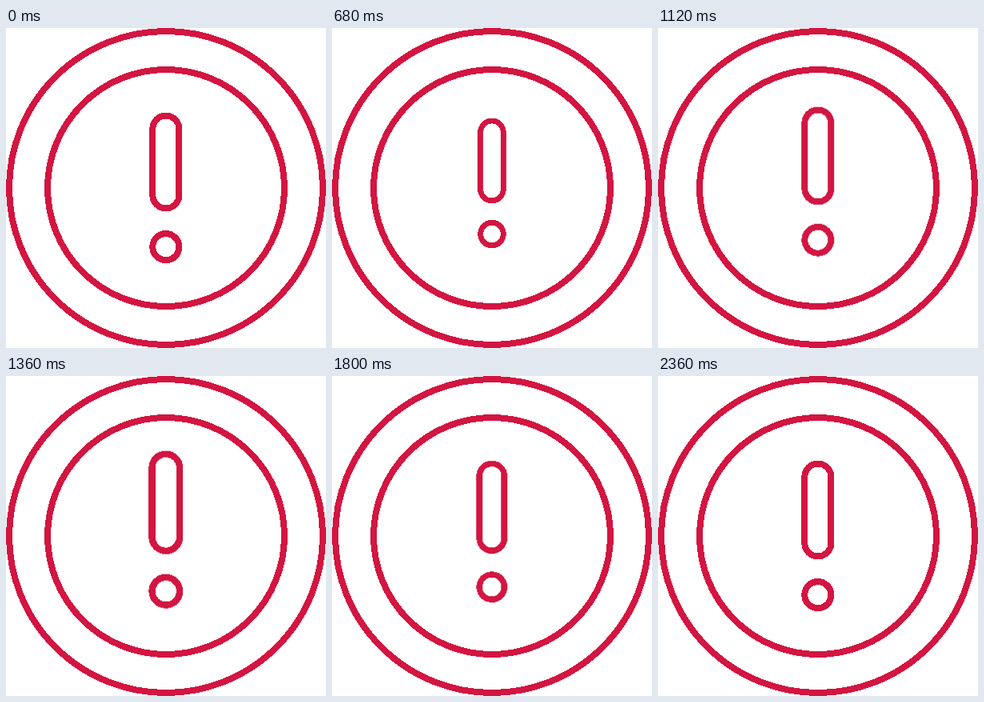
An HTML page without scripts that plays this animation: 400x400 px, repeating every 2.64 s.

```html
<!DOCTYPE html>
<html lang="en">
<head>
<meta charset="utf-8">
<title>Alert</title>
<style>
  html, body {
    margin: 0;
    width: 100%;
    height: 100%;
    overflow: hidden;
    background: #fff;
  }
  svg {
    display: block;
    width: 100%;
    height: 100%;
    fill: none;
    stroke: #d31541;
    stroke-width: 8;
    shape-rendering: crispEdges;
  }
  .lift { animation: lift 2640ms linear infinite; }
  .pulse {
    transform-origin: 200px 200px;
    animation: pulse 2640ms cubic-bezier(.37, 0, .63, 1) infinite;
  }
  @keyframes lift {
    0%, 6.06% { transform: translateY(0); }
    16.66% { transform: translateY(-4px); }
    25.75% { transform: translateY(-6px); }
    34.84%, 60.6% { transform: translateY(-8px); }
    74.24% { transform: translateY(-3.5px); }
    81.81% { transform: translateY(-1px); }
    89.39%, 100% { transform: translateY(0); }
  }
  @keyframes pulse {
    0%, 6.06% { transform: scale(1); }
    16.66% { transform: scale(1.01); }
    26.1% { transform: scale(.863); }
    36.7% { transform: scale(1.136); }
    46.2% { transform: scale(.92); }
    55.9% { transform: scale(1.136); }
    66.5% { transform: scale(.92); }
    75% { transform: scale(1.134); }
    79.5% { transform: scale(1.136); }
    89.39%, 100% { transform: scale(1); }
  }
</style>
</head>
<body>
<svg viewBox="0 0 400 400">
  <circle cx="200" cy="200" r="196"/>
  <circle cx="200" cy="200" r="148"/>
  <g class="lift">
    <g class="pulse">
      <rect x="183.3" y="109.6" width="33.1" height="115.8" rx="16.55"/>
      <circle cx="199.85" cy="273.6" r="16.55"/>
    </g>
  </g>
</svg>
</body>
</html>
```
